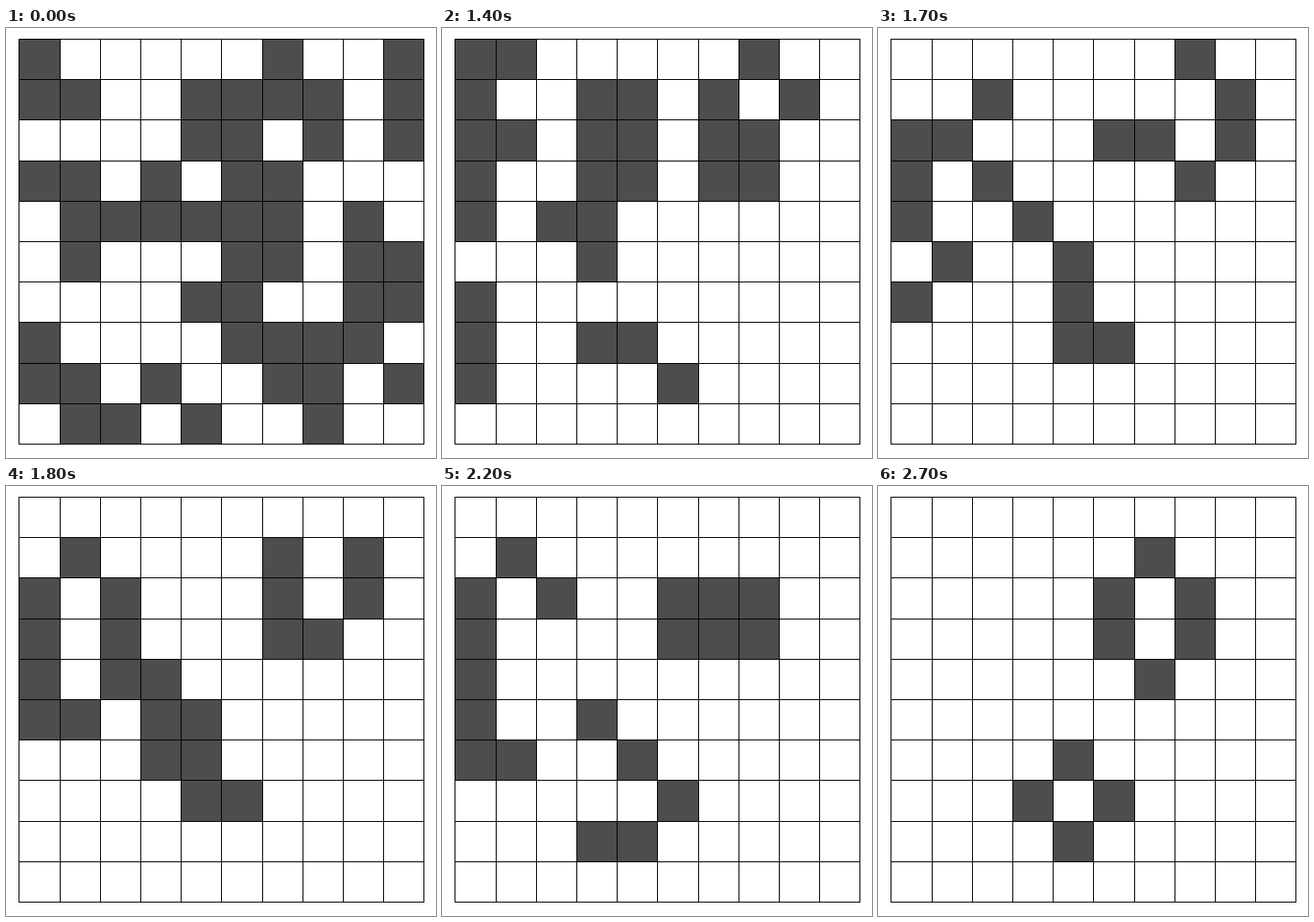
An HTML page with a canvas for the animation above (4 s loop, 480x480 px).

```html
<!DOCTYPE html>
<html lang="en">
<head>
<meta charset="utf-8">
<title>Game of Life</title>
<style>
html, body { margin: 0; width: 100%; height: 100%; overflow: hidden; background: #fff; }
canvas { display: block; }
</style>
</head>
<body>
<canvas width="480" height="480"></canvas>
<script>
const SIZE = 10, PITCH = 45.2, LOOP = 4000;
const SEED = [
  '#.....#..#',
  '##..####.#',
  '....##.#.#',
  '##.#.##...',
  '.######.#.',
  '.#...##.##',
  '....##..##',
  '#....####.',
  '##.#..##.#',
  '.##.#..#..'
].map(row => [...row].map(c => c === '#'));

// The first change skips ahead three generations; each later one advances by one.
const STEP_TIMES = [1300, 1300, 1300, 1400, 1600, 1700, 1800,
  2000, 2100, 2200, 2300, 2500, 2600, 2700];

const lineX = i => Math.floor(14.9 + i * PITCH);
const lineY = i => Math.floor(12.45 + i * PITCH);

// Cells outside the board count as dead.
function nextGeneration(grid) {
  const neighbours = (r, c) => {
    let n = 0;
    for (let y = r - 1; y <= r + 1; y++)
      for (let x = c - 1; x <= c + 1; x++)
        if ((y !== r || x !== c) && grid[y]?.[x]) n++;
    return n;
  };
  return grid.map((row, r) => row.map((alive, c) => {
    const n = neighbours(r, c);
    return n === 3 || (alive && n === 2);
  }));
}

const generations = [SEED];
STEP_TIMES.forEach(() => generations.push(nextGeneration(generations.at(-1))));

const ctx = document.querySelector('canvas').getContext('2d');

function draw(grid) {
  ctx.fillStyle = '#fff';
  ctx.fillRect(0, 0, 480, 480);

  ctx.fillStyle = '#4d4d4d';
  grid.forEach((row, r) => row.forEach((alive, c) => {
    const x = lineX(c), y = lineY(r);
    if (alive) ctx.fillRect(x, y, lineX(c + 1) - x, lineY(r + 1) - y);
  }));

  ctx.fillStyle = '#000';
  const left = lineX(0), top = lineY(0);
  for (let i = 0; i <= SIZE; i++) {
    ctx.fillRect(lineX(i), top, 1, lineY(SIZE) - top + 1);
    ctx.fillRect(left, lineY(i), lineX(SIZE) - left + 1, 1);
  }
}

const start = performance.now();
function tick() {
  const t = (performance.now() - start) % LOOP;
  draw(generations[STEP_TIMES.filter(s => s <= t).length]);
  requestAnimationFrame(tick);
}
tick();
</script>
</body>
</html>
```
